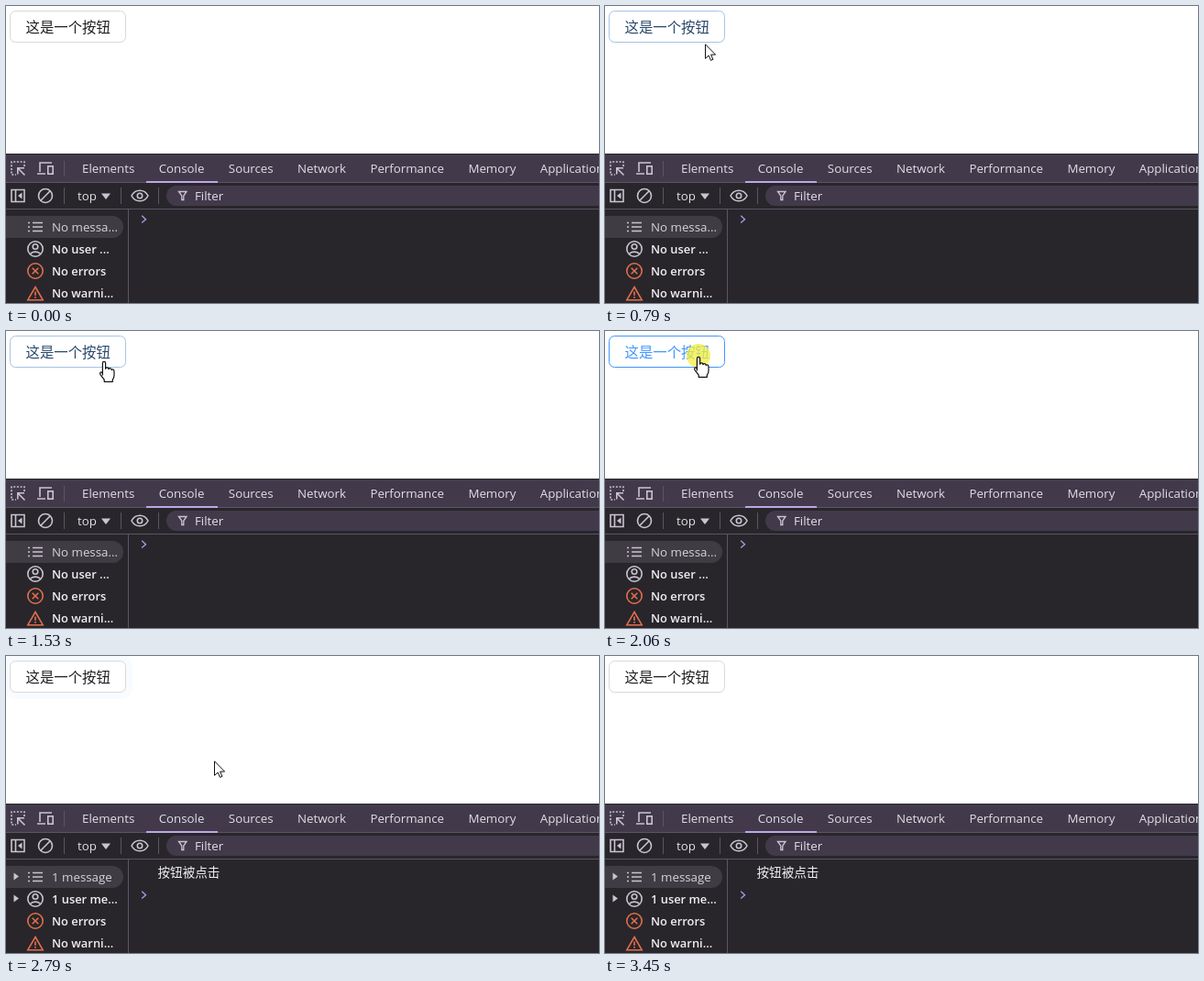
Animation of 647 by 324 pixels, one loop 4120 ms. Source, as an HTML page:

```html
<!DOCTYPE html>
<html lang="zh">
<head>
<meta charset="utf-8">
<style>
  html, body { margin: 0; width: 100%; height: 100%; overflow: hidden; background: #fff; }
  svg { display: block; }
  text { font: 13.3px "Open Sans", "Noto Sans", sans-serif; fill: #e3dfe7; }
  .cjk { font-family: "Noto Sans CJK SC", "Noto Sans CJK", sans-serif; }
  .side text { font-size: 12.9px; font-weight: 600; fill: #f1eff3; }
  .side #count { font-size: 13.3px; font-weight: 400; fill: #d8d4db; }
  .icon { fill: none; stroke: #cac4d0; stroke-width: 1.6; }
  .solid { fill: #cac4d0; stroke: none; }
  .alert { stroke: #e46f4c; }
  .rule { stroke: #5d5466; fill: none; }
</style>
</head>
<body>
<svg width="647" height="324" viewBox="0 0 647 324">
  <rect width="647" height="324" fill="#fff"/>

  <rect id="glow" fill="#1677ff"/>
  <rect x="4.5" y="7" width="126" height="34.5" rx="6" fill="#fafafa"/>
  <rect id="button" x="4.5" y="5.5" width="126" height="34" rx="6" fill="#fff"/>
  <text id="label" class="cjk" x="21.5" y="29" style="font-size:15.4px">这是一个按钮</text>

  <rect y="161" width="647" height="163" fill="#28262b"/>
  <rect y="162" width="647" height="30" fill="#423a4b"/>
  <path class="rule" d="M0 192.5H647M0 221.5H647M133.5 222V324M63.5 169V186M63.5 198V216M125.5 198V216M166.5 198V216"/>
  <rect x="153" y="191" width="78" height="2" fill="#bfa5e6"/>
  <text id="tabs" x="83" y="182"></text>

  <g class="icon">
    <path d="M20 175V170H6V184H11" stroke-dasharray="2 1.7"/>
    <path d="M20.5 184.5L13 177M12.8 183.5V176.8H20"/>
    <path d="M37 181V171H50M34 183H43"/>
    <rect x="45.8" y="174.8" width="5.4" height="8.4"/>
    <path d="M6 200.5H20V213.5H6ZM10.5 200V214"/>
    <path class="solid" d="M17.5 203.5V210.5L13 207Z"/>
    <circle cx="43" cy="207" r="7.5"/>
    <path d="M37.8 212.2L48.2 201.8"/>
    <path class="solid" d="M104 204.5H114L109 211Z"/>
    <path d="M137 207C141 199.3 151 199.3 155 207C151 214.7 141 214.7 137 207Z"/>
    <circle cx="146" cy="207" r="2.7"/>
  </g>
  <text x="78" y="212">top</text>
  <path d="M647 196H186A11 11 0 0 0 186 218H647Z" fill="#423a4b"/>
  <path class="icon" d="M188.5 202.5H197L193.8 207V211.5H191.8V207Z" style="stroke-width:1.3"/>
  <text x="206" y="212">Filter</text>

  <path d="M0 229H116A12 12 0 0 1 116 253H0Z" fill="#403c43"/>
  <g class="icon">
    <path d="M29 236.5H40M29 241H40M29 245.5H40"/>
    <path d="M24 236.5H26M24 241H26M24 245.5H26"/>
    <circle cx="32" cy="265" r="8.2"/>
    <circle cx="32" cy="262.5" r="2.8"/>
    <path d="M26.3 270.5C29 267.3 35 267.3 37.7 270.5"/>
    <g class="alert">
      <circle cx="32" cy="289" r="8.2"/>
      <path d="M28.7 285.7L35.3 292.3M35.3 285.7L28.7 292.3"/>
      <path d="M32 306.5L40.2 320.7H23.8ZM32 311.5V316M32 317V318.7"/>
    </g>
  </g>
  <g class="side">
    <text id="count" x="50" y="246"></text>
    <text id="user" x="50" y="270"></text>
    <text x="50" y="294">No errors</text>
    <text x="50" y="318">No warni...</text>
  </g>
  <g id="logged">
    <path class="solid" d="M8.5 236.5V244.5L14 240.5ZM8.5 260.5V268.5L14 264.5Z"/>
    <text class="cjk" x="165.5" y="241" style="font-size:13.6px;font-weight:300;fill:#f1eff3">按钮被点击</text>
  </g>
  <path id="prompt" d="M148.2 228.8L152.5 232.7L148.2 236.6" fill="none" stroke="#a39ae0" stroke-width="1.4"/>

  <circle id="press" cx="102" cy="27" r="13" fill="#f3ee3c" opacity=".75"/>
  <g id="pointer" fill="#fff" stroke="#111" stroke-linejoin="round">
    <path id="arrow" d="M.5 .8V16.3L4.1 13L6.5 18.4L8.9 17.3L6.6 12.1H11.6Z"/>
    <path id="hand" stroke-width="1.2" d="M-1.6 15V2.2Q-1.6 .4 0 .4T1.6 2.2V8.2Q1.8 6.9 3.3 6.9T5 8.7Q5.3 7.6 6.6 7.7T8.2 9.5Q8.6 8.6 9.7 8.8T11 10.7V15.5Q11 18 9.3 20V22.3H.2V20.2L-4 14.6Q-5 12.8-3.8 12T-1.6 13.4Z"/>
  </g>
</svg>
<script>
const LOOP = 4120, STEP = 66.4; // ms; the picture changes once per step
const PRESS = 31, CLICK = 34, EXIT = 52;
const GLOW_GROW = 265, GLOW_FADE = 1100;

const linear = k => k;
const easeIn = k => k * k;
const easeOut = k => k * (2 - k);
const easeInOut = k => k * k * (3 - 2 * k);

// Each trip of the pointer is a Bezier curve that starts where the last one ended
const ENTRY = [360, 302];
const trips = [
  { from: 2, to: 9, ease: easeOut, via: [[278, 184]], end: [71, 68] },
  { from: 9, to: 16, ease: linear, via: [[46, -3], [169, 72]], end: [298, 88] },
  { from: 16, to: 24, ease: easeInOut, via: [[160, 88]], end: [102, 28] },
  { from: 38, to: 44, ease: easeInOut, via: [[135, 66]], end: [307, 158] },
  { from: 44, to: 46, ease: linear, via: [], end: [293, 151] },
  { from: 47, to: 51, ease: easeIn, via: [], end: [577, 306] }
];

const $ = id => document.getElementById(id);
const show = (id, on) => $(id).setAttribute("display", on ? "inline" : "none");
const set = (id, attrs) => {
  for (const name in attrs) $(id).setAttribute(name, attrs[name]);
};
const lerp = (a, b, k) => a.map((v, i) => v + (b[i] - v) * k);
const bezier = (points, k) => points.length === 1 ? points[0]
  : bezier(points.slice(1).map((p, i) => lerp(points[i], p, k)), k);
const rgb = color => `rgb(${color.map(Math.round)})`;

const tabs = ["Elements", "Console", "Sources", "Network", "Performance", "Memory", "Application"];
$("tabs").innerHTML = tabs.map((name, i) => `<tspan dx="${i ? 26.4 : 0}">${name}</tspan>`).join("");

function pointerAt(step) {
  if (step < trips[0].from || step >= EXIT) return null;
  const i = trips.filter(trip => trip.from <= step).length - 1;
  const { from, to, ease, via, end } = trips[i];
  const start = i ? trips[i - 1].end : ENTRY;
  return bezier([start, ...via, end], ease(Math.min((step - from) / (to - from), 1)));
}

function hovers(step) {
  const p = pointerAt(step);
  return p !== null && p[0] >= 4 && p[0] <= 131 && p[1] >= 5 && p[1] <= 40;
}

function drawButton(step) {
  // Hover colour eases over three steps
  const hover = [0, 1, 2].filter(n => hovers(step - n)).length / 3;
  const blue = [64, 150, 255];
  set("button", { stroke: rgb(lerp([217, 217, 217], blue, hover)) });
  $("label").style.fill = rgb(lerp([31, 31, 31], blue, hover));

  const age = (step - CLICK) * STEP;
  const glowing = age >= 0 && age < GLOW_FADE;
  show("glow", glowing);
  if (!glowing) return;
  const spread = 7 * easeOut(Math.min((age + STEP) / GLOW_GROW, 1));
  const fade = Math.sqrt(1 - (1 - age / GLOW_FADE) ** 2);
  set("glow", {
    x: 4 - spread, y: 5 - spread, width: 127 + 2 * spread, height: 35 + 2 * spread,
    rx: 6 + spread, opacity: 0.2 * (1 - fade)
  });
}

function drawConsole(clicked) {
  show("logged", clicked);
  $("count").textContent = clicked ? "1 message" : "No messa...";
  $("user").textContent = clicked ? "1 user me..." : "No user ...";
  set("prompt", { transform: `translate(0 ${clicked ? 28 : 0})` });
}

function drawPointer(step) {
  show("press", step >= PRESS && step < CLICK);
  const p = pointerAt(step);
  show("pointer", p);
  if (p) set("pointer", { transform: `translate(${p.map(Math.round)})` });
  show("hand", hovers(step));
  show("arrow", !hovers(step));
}

function draw(time) {
  const step = Math.floor((time % LOOP + 8) / STEP);
  drawButton(step);
  drawConsole(step >= CLICK);
  drawPointer(step);
}

const start = performance.now();
function tick() {
  draw(performance.now() - start);
  requestAnimationFrame(tick);
}
tick();
</script>
</body>
</html>
```
